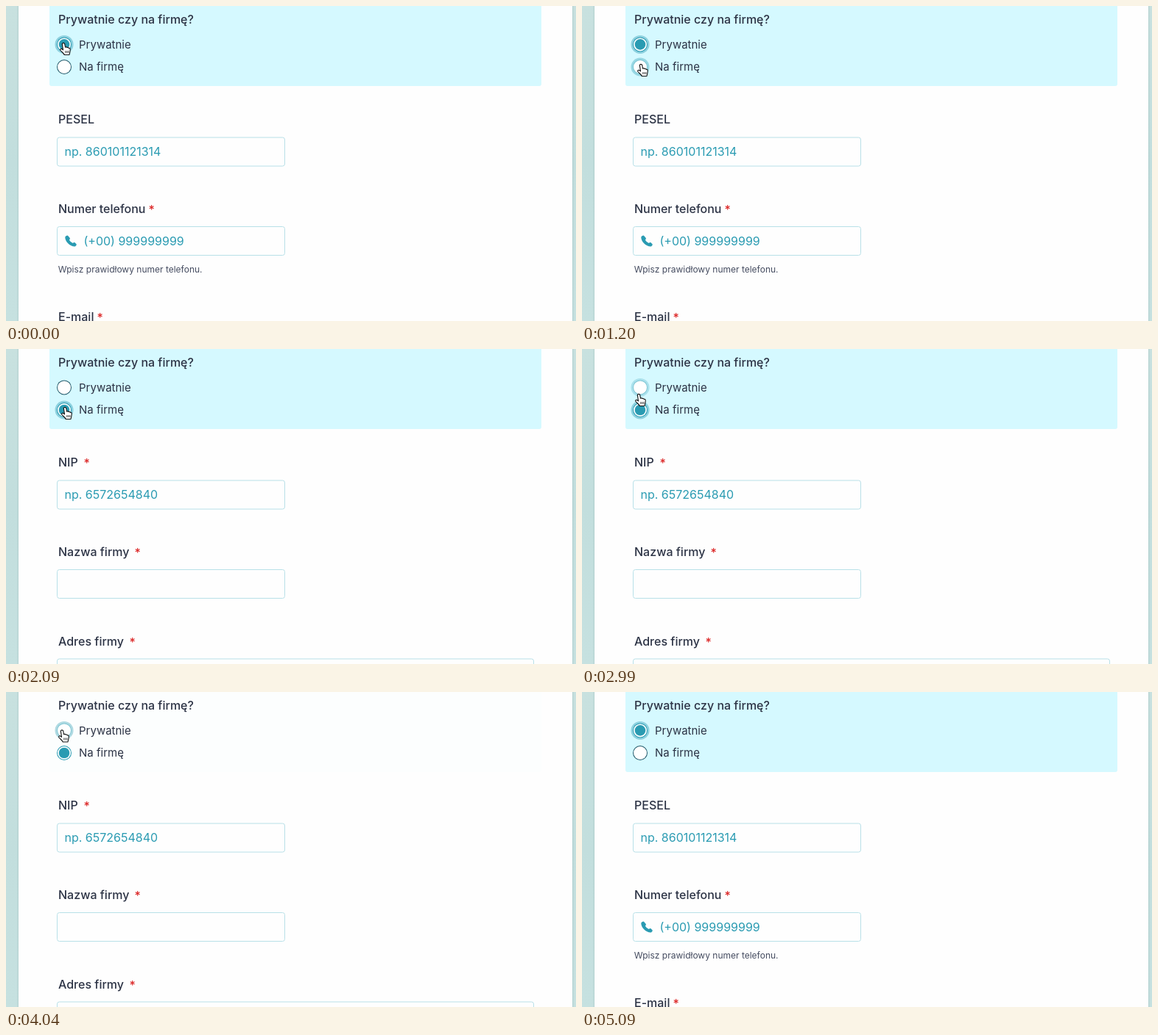
Animation, 774 px wide and 429 px high, one loop 6290 ms. Source, as an HTML page with a canvas:

```html
<!DOCTYPE html>
<html lang="pl">
<head>
<meta charset="utf-8">
<title>Formularz</title>
<style>
  html, body { margin: 0; width: 100%; height: 100%; overflow: hidden; background: #fefefe; }
  canvas { display: block; }
</style>
</head>
<body>
<canvas id="stage" width="774" height="429"></canvas>
<script>
const ctx = document.getElementById("stage").getContext("2d");
const LOOP = 6290;
const TEAL = "#2a9bb2", INK = "#2c3345", DARK = "#245a6b", LIGHT = "#7fc6d4", BORDER = "#b8e0e8";

// dot: strength of the selection, ring: opacity of the halo, hover: pale outline
const radio = (dot, ring, hover = false) => ({ dot, ring, hover });

// Each step changes only the listed parts; the rest carries over.
const steps = [
  [0, { hand: [73, 49.5], handAlpha: 1, top: radio(1, 0.42), bottom: radio(0, 0), panel: 1, company: false }],
  [600, { hand: [76.5, 60] }],
  [750, { hand: [78.5, 68] }],
  [900, { hand: [78.5, 71] }],
  [1050, { hand: [77.5, 78], bottom: radio(0, 0.22, true) }],
  [1200, { hand: [75, 78.5], bottom: radio(0, 0.36, true) }],
  [1800, { top: radio(0.3, 0.1), bottom: radio(0.5, 0.36) }],
  [1950, { top: radio(0, 0), bottom: radio(0.85, 0.42), company: true }],
  [2090, { bottom: radio(1, 0.42) }],
  [2990, { hand: [72, 60.5], top: radio(0, 0.25, true) }],
  [3140, { hand: [71, 51], top: radio(0, 0.36, true) }],
  [4040, { bottom: radio(1, 0), panel: 0.06 }],
  [4190, { top: radio(0.8, 0.36), bottom: radio(0, 0), panel: 1, company: false }],
  [4340, { top: radio(1, 0.42) }],
  [4940, { handAlpha: 0.4 }],
  [5090, { handAlpha: 0 }]
];

const handShape = new Path2D("M3.3 2.2C3.6 .5 6.2 .4 6.7 2L7.6 6.8C8.3 6 9.5 6.2 9.9 7.1C10.7 6.5 11.8 6.9 12.1 7.9" +
  "C13.2 7.5 14.2 8.2 14.2 9.5C14.3 12.5 13.6 13.5 13 17L6.2 17C5.6 14.8 2.2 12.8 .8 10.7" +
  "C.1 9.2 1.8 8.2 3.2 9.3L4.5 10.4Z");
const handLines = new Path2D("M7.8 11.5V14.5M9.8 11.5V14.5M11.8 11.5V14.5");
const phoneShape = new Path2D("M80.3 314.6Q81.3 312.6 83.8 312.6L86.8 316.1Q87.3 317.6 85.8 318.6Q87.3 321.6 90.8 323.1" +
  "Q91.8 321.6 93.3 322.1L95.8 324.6Q95.8 326.6 93.8 327.6C87.3 328.1 79.8 320.6 80.3 314.6Z");

function text(str, x, y, size = 16, weight = 500, color = INK) {
  ctx.font = `${weight} ${size}px Inter, sans-serif`;
  ctx.fillStyle = color;
  ctx.fillText(str, x, y);
}

function label(str, y, starX) {
  text(str, 71, y);
  if (starX) text("*", starX, y + 1, 16, 500, "#dc2626");
}

const placeholder = (str, x, y) => text(str, x, y, 16, 400, TEAL);

function roundRect(x, y, w, h, r) {
  ctx.beginPath();
  ctx.roundRect(x, y, w, h, r);
}

function input(y, width = 309) {
  roundRect(69.5, y, width, 39, 3);
  ctx.fillStyle = "#fefefe";
  ctx.fill();
  ctx.strokeStyle = BORDER;
  ctx.lineWidth = 1;
  ctx.stroke();
}

function disc(y, r, color, alpha = 1) {
  ctx.globalAlpha = alpha;
  ctx.fillStyle = color;
  ctx.beginPath();
  ctx.arc(79, y, r, 0, Math.PI * 2);
  ctx.fill();
  ctx.globalAlpha = 1;
}

function drawRadio(y, { dot, ring, hover }) {
  if (ring) disc(y, 12.5, TEAL, ring);
  disc(y, 10, hover ? LIGHT : dot ? TEAL : DARK);
  disc(y, 9, "#fff");
  if (dot) disc(y, 7.3, TEAL, dot);
}

function drawBackdrop() {
  const shade = ctx.createLinearGradient(0, 0, 0, 429);
  shade.addColorStop(0, "#c8e1df");
  shade.addColorStop(0.5, "#c2dedd");
  shade.addColorStop(1, "#c6e1e0");
  ctx.fillStyle = shade;
  ctx.fillRect(0, 0, 774, 429);
  ctx.save();
  ctx.shadowColor = "rgba(50, 95, 100, .25)";
  ctx.shadowBlur = 3;
  ctx.fillStyle = "#fefefe";
  ctx.fillRect(17, -10, 752, 449);
  ctx.restore();
}

function drawPrivateFields() {
  label("PESEL", 160.4);
  input(179);
  placeholder("np. 860101121314", 79.5, 204);
  label("Numer telefonu", 282, 193.5);
  input(300.5);
  ctx.fillStyle = TEAL;
  ctx.fill(phoneShape);
  placeholder("(+00) 999999999", 105.5, 325.5);
  text("Wpisz prawidłowy numer telefonu.", 70.8, 363, 12, 400, "#454c60");
  label("E-mail", 429, 123.5);
}

function drawCompanyFields() {
  label("NIP", 160.4, 105.5);
  input(179);
  placeholder("np. 6572654840", 79.5, 204);
  label("Nazwa firmy", 282, 174.5);
  input(300.5);
  label("Adres firmy", 403.5, 167.5);
  input(422, 647);
}

function drawHand([x, y], alpha) {
  if (!alpha) return;
  ctx.save();
  ctx.globalAlpha = alpha;
  ctx.translate(x, y);
  ctx.lineJoin = "round";
  ctx.fillStyle = "#fff";
  ctx.strokeStyle = "#111";
  ctx.lineWidth = 1.1;
  ctx.fill(handShape);
  ctx.stroke(handShape);
  ctx.lineWidth = 0.8;
  ctx.stroke(handLines);
  ctx.restore();
}

function draw(time) {
  const state = Object.assign({}, ...steps.filter(([at]) => at <= time).map(([, part]) => part));
  drawBackdrop();
  ctx.globalAlpha = state.panel;
  ctx.fillStyle = "#d5f9ff";
  roundRect(59, -4, 668, 113, 3);
  ctx.fill();
  ctx.globalAlpha = 1;

  label("Prywatnie czy na firmę?", 24);
  text("Prywatnie", 99, 57.5, 15, 400);
  text("Na firmę", 99, 88.3, 15, 400);
  drawRadio(52.4, state.top);
  drawRadio(83, state.bottom);
  if (state.company) drawCompanyFields();
  else drawPrivateFields();
  drawHand(state.hand, state.handAlpha);
}

const start = performance.now();
function tick() {
  draw((performance.now() - start) % LOOP);
  requestAnimationFrame(tick);
}
tick();
</script>
</body>
</html>
```
